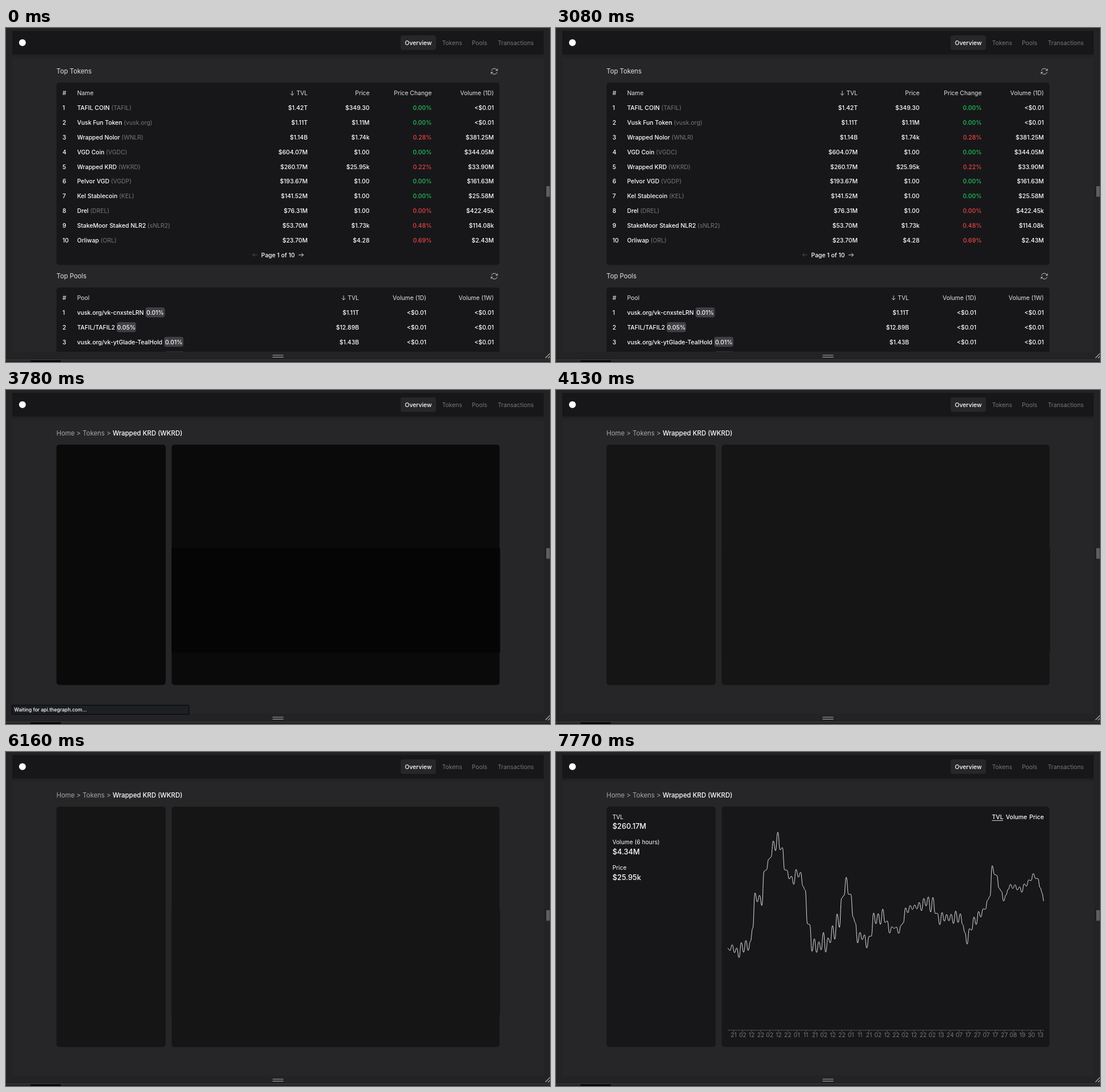
Recreate the animation shown at these times as an HTML page with a canvas. Size 954x587 px, loop 8 s.

```html
<!DOCTYPE html>
<html lang="en">
<head>
<meta charset="utf-8">
<title>Token dashboard</title>
<style>
html, body { margin: 0; height: 100%; overflow: hidden; background: #262628; }
canvas { display: block; }
</style>
</head>
<body>
<canvas id="stage" width="954" height="587"></canvas>
<script>
const ctx = document.getElementById('stage').getContext('2d');
const LOOP = 8000, SELECT = 3710, LOADING = 3780, FADE = 3920, LOADED = 6300, CHART = 6440;
const PANEL = '#17171a', WHITE = '#fff', HEAD = '#e4e4e7', DIM = '#77777c';
const GREEN = '#22c55e', RED = '#ef4444';
const ROW = 25.9, LEFT = 88.5, RIGHT = 855.5;

const tokens = [
  ['TAFIL COIN', 'TAFIL', '$1.42T', '$349.30', '0.00%', GREEN, '<$0.01'],
  ['Vusk Fun Token', 'vusk.org', '$1.11T', '$1.11M', '0.00%', GREEN, '<$0.01'],
  ['Wrapped Nolor', 'WNLR', '$1.14B', '$1.74k', '0.28%', RED, '$381.25M'],
  ['VGD Coin', 'VGDC', '$604.07M', '$1.00', '0.00%', GREEN, '$344.05M'],
  ['Wrapped KRD', 'WKRD', '$260.17M', '$25.95k', '0.22%', RED, '$33.90M'],
  ['Pelvor VGD', 'VGDP', '$193.67M', '$1.00', '0.00%', GREEN, '$161.63M'],
  ['Kel Stablecoin', 'KEL', '$141.52M', '$1.00', '0.00%', GREEN, '$25.58M'],
  ['Drel', 'DREL', '$76.31M', '$1.00', '0.00%', RED, '$422.45k'],
  ['StakeMoor Staked NLR2', 'sNLR2', '$53.70M', '$1.73k', '0.48%', RED, '$114.08k'],
  ['Orliwap', 'ORL', '$23.70M', '$4.28', '0.69%', RED, '$2.43M'],
];
const pools = [
  ['vusk.org/vk-cnxsteLRN', '0.01%', '$1.11T'],
  ['TAFIL/TAFIL2', '0.05%', '$12.89B'],
  ['vusk.org/vk-ytGlade-TealHold', '0.01%', '$1.43B'],
];
const days = '21 02 12 22 02 12 22 01 11 21 02 12 22 01 11 21 02 12 22 02 12 22 02 13 24 07 17 27 07 17 27 08 19 30 13'.split(' ');
// turning points of the TVL curve; the small swings between them are random
const trend = [
  [301, 350], [342, 338], [349, 262], [361, 258], [368, 202], [389, 152], [399, 178], [403, 224], [434, 218],
  [441, 300], [450, 335], [481, 332], [500, 280], [508, 222], [520, 260], [526, 328], [550, 332], [557, 290],
  [576, 290], [582, 312], [606, 306], [614, 278], [662, 266], [670, 292], [711, 286], [718, 338], [730, 298],
  [758, 270], [766, 194], [785, 262], [795, 236], [815, 242], [837, 217], [847, 226], [855, 262],
];
const refreshIcon = new Path2D('M16 9.35h5M3 19.64v-5h5M3 14.65l3.18 3.18a8.25 8.25 0 0 0 13.8-3.7M4.03 9.87a8.25 8.25 0 0 1 13.8-3.7l3.18 3.18V4.36');

function seeded(seed) {
  return () => (seed = seed * 16807 % 2147483647) / 2147483647;
}

function trendAt(x) {
  const i = Math.max(1, trend.findIndex(point => point[0] >= x));
  const [x0, y0] = trend[i - 1], [x1, y1] = trend[i];
  return y0 + (y1 - y0) * (x - x0) / (x1 - x0);
}

function curvePath() {
  const random = seeded(11), step = 4;
  let d = 'M301 345', last = 345;
  for (let x = 305, side = 1; x < 855; x += step, side = -side) {
    const swing = x < 530 ? 20 : x < 770 ? 14 : 7;
    const y = trendAt(x) + side * swing * random();
    d += `C${x - 2} ${last} ${x - 2} ${y} ${x} ${y}`;
    last = y;
  }
  return d + 'L855 262';
}
const curve = curvePath();

// y is the vertical middle of the capitals; returns the x where the text ends
function text(str, x, y, color = WHITE, { size = 10.4, weight = 500, align = 'left' } = {}) {
  ctx.font = `${weight} ${size}px Inter, sans-serif`;
  ctx.textAlign = align;
  ctx.fillStyle = color;
  ctx.fillText(str, x, y + size * 0.365);
  return x + ctx.measureText(str).width;
}
const right = (str, x, y, color, weight) => text(str, x, y, color, { align: 'right', weight });

function box(x, y, w, h, color, radius = 0) {
  ctx.fillStyle = color;
  ctx.beginPath();
  ctx.roundRect(x, y, w, h, radius);
  ctx.fill();
}

function lines(d, color, width = 1) {
  ctx.strokeStyle = color;
  ctx.lineWidth = width;
  ctx.lineJoin = 'round';
  ctx.stroke(new Path2D(d));
}

function sectionTitle(str, y) {
  text(str, LEFT, y, HEAD, { size: 11.3, weight: 400 });
  ctx.save();
  ctx.translate(849, y - 7.1);
  ctx.scale(0.61, 0.61);
  ctx.strokeStyle = '#d4d4d8';
  ctx.lineWidth = 1.6;
  ctx.stroke(refreshIcon);
  ctx.restore();
}

function tableHead(name, columns, y) {
  text('#', 99, y, HEAD);
  text(name, 124.7, y, HEAD, { weight: 400 });
  columns.forEach(([label, x]) => right(label, x, y, HEAD, 400));
  const x = columns[0][1] - 27;
  lines(`M${x} ${y - 4}v8m-3.2 -3.2l3.2 3.2l3.2 -3.2`, HEAD, 0.9);
}

function overview(selected) {
  sectionTitle('Top Tokens', 76);
  box(LEFT, 96, 777, 320.5, PANEL, 5);
  tableHead('Name', [['TVL', 529], ['Price', 637.5], ['Price Change', 746.5], ['Volume (1D)', RIGHT]], 114.3);
  tokens.forEach(([name, symbol, locked, price, change, tone, volume], i) => {
    const y = 140.2 + i * ROW, lit = selected && i === 4;
    const main = lit ? '#bdd6df' : WHITE;
    if (lit) box(98, 235.5, 757.5, 15.5, '#235c72');
    text(i + 1, 99, y, main);
    const end = text(name + ' ', 124.7, y, main);
    text(`(${symbol})`, end, y, lit ? '#5d8696' : DIM, { weight: 400 });
    right(locked, 529, y, main);
    right(price, 637.5, y, main);
    right(change, 746.5, y, lit ? '#75808a' : tone);
    right(volume, RIGHT, y, main);
  });
  lines('M440.5 398.8h-8m3.2 -3.2l-3.2 3.2l3.2 3.2', '#505055');
  text('Page 1 of 10', 477, 399, WHITE, { align: 'center' });
  lines('M513 398.8h8.5m-3.2 -3.2l3.2 3.2l-3.2 3.2', HEAD);

  sectionTitle('Top Pools', 436);
  box(LEFT, 456, 777, 113, PANEL, [5, 5, 0, 0]);
  tableHead('Pool', [['TVL', 619], ['Volume (1D)', 737], ['Volume (1W)', RIGHT]], 474);
  pools.forEach(([name, fee, locked], i) => {
    const y = 500 + i * ROW;
    text(i + 1, 99, y);
    const x = text(name, 124.7, y) + 3;
    box(x, y - 9, 34, 17.5, '#3f3f44', 4);
    text(fee, x + 17, y, WHITE, { align: 'center' });
    right(locked, 619, y);
    right('<$0.01', 737, y);
    right('<$0.01', RIGHT, y);
  });
  box(281, 568.3, 30, 0.9, '#3a3a3e');
}

function chart() {
  lines(curve, '#e0e0e0');
  lines('M301 489H855', '#58585c');
  days.forEach((day, i) => {
    const x = 311.5 + i * 538 / (days.length - 1);
    lines(`M${x} 489v4`, '#58585c');
    text(day, x, 497.6, DIM, { weight: 400, align: 'center' });
  });
}

function tokenPage(t) {
  let x = LEFT;
  for (const part of ['Home', ' > ', 'Tokens', ' > ']) x = text(part, x, 76, '#a8a8ad', { size: 11.4, weight: 400 });
  text('Wrapped KRD (WKRD)', x, 76, WHITE, { size: 11.4 });

  const ready = t >= LOADED;
  // the placeholder lightens in four 70 ms steps while the status bubble fades
  const fade = Math.min(Math.max(Math.floor((t - FADE) / 70) + 1, 0), 4) / 4;
  const grey = from => {
    const level = Math.round(from + (21 - from) * fade);
    return `rgb(${level},${level},${level})`;
  };
  const fill = ready ? PANEL : grey(10);
  box(LEFT, 96, 191.5, 422.5, fill, 5);
  box(290.5, 96, 575, 422.5, fill, 5);
  if (!ready) box(290.5, 278, 576, 183.5, grey(5));

  if (ready) {
    [['TVL', '$260.17M'], ['Volume (6 hours)', '$4.34M'], ['Price', '$25.95k']].forEach(([label, value], i) => {
      text(label, 99, 114.3 + i * 44.3, WHITE, { weight: 400, size: 10.2 });
      text(value, 99, 130.3 + i * 45, WHITE, { size: 12.8 });
    });
    text('TVL', 764.5, 114.3);
    text('Volume', 788.8, 114.3);
    right('Price', RIGHT, 114.3);
    box(764.5, 120, 19.5, 1, '#d0d0d0');
  }
  if (t >= CHART) chart();

  if (fade < 1) {
    ctx.globalAlpha = 1 - fade;
    box(10, 553.5, 311.5, 17, '#000', 2);
    box(11, 554.5, 309.5, 15, '#1c2023', 1);
    text('Waiting for api.thegraph.com...', 14.3, 561.8, WHITE, { size: 8.6 });
    ctx.globalAlpha = 1;
  }
}

function frame() {
  box(0, 0, 954, 587, '#232325');
  box(11, 5, 932, 564, '#262628');
  const shadow = ctx.createLinearGradient(0, 46, 0, 55);
  shadow.addColorStop(0, '#202022');
  shadow.addColorStop(1, '#262628');
  box(11, 46, 932, 9, shadow);
  box(11, 5, 932, 41.5, PANEL);
  ctx.fillStyle = WHITE;
  ctx.beginPath();
  ctx.arc(28.8, 25.8, 6, 0, 7);
  ctx.fill();
  box(692, 13, 62, 25.5, '#27272a', 4);
  text('Overview', 723, 26, WHITE, { align: 'center' });
  text('Tokens', 764.7, 26, DIM, { weight: 400 });
  text('Pools', 817, 26, DIM, { weight: 400 });
  text('Transactions', 862.5, 26, DIM, { weight: 400 });
}

function handles() {
  lines('M949 278v18.5M952 278v18.5M467.5 575h19M467.5 578.5h19', '#b4b4b6', 1.2);
  lines('M946 580l8 -8M950.5 580.5l3.5 -3.5', '#b4b4b6', 1.2);
  box(0, 583, 954, 1, '#444446');
  box(0, 584, 954, 3, '#222224');
  box(43, 584, 53, 3, '#000');
}

function draw() {
  const t = performance.now() % LOOP;
  frame();
  if (t < LOADING) overview(t >= SELECT);
  else tokenPage(t);
  handles();
  requestAnimationFrame(draw);
}
draw();
</script>
</body>
</html>
```
